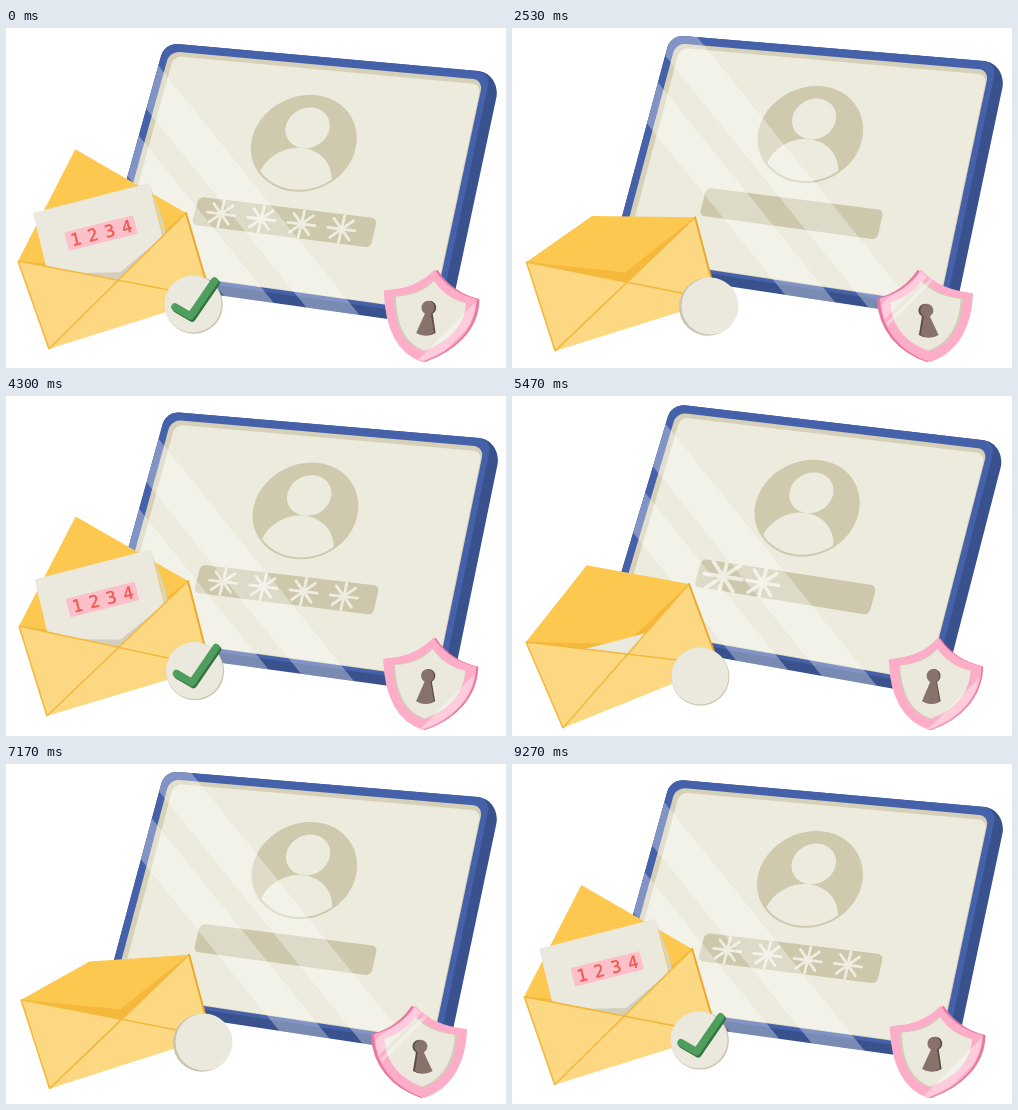
These frames come from a looping animation (500 by 340 pixels, 9.31 s). An HTML page:

```html
<!DOCTYPE html>
<html lang="en">
<head>
<meta charset="utf-8">
<title>Verification code</title>
<style>
  html, body { margin: 0; width: 100%; height: 100%; overflow: hidden; background: #fff; }
  svg { display: block; width: 100vw; height: 100vh; }
  text { font: 17px "DejaVu Sans Mono", monospace; text-anchor: middle; fill: #ee5b50; stroke: #ee5b50; stroke-width: .4; }
</style>
</head>
<body>
<svg viewBox="0 0 500 340">
  <defs>
    <clipPath id="slabClip"><path id="slabArea"/></clipPath>
    <clipPath id="faceClip"><path id="avatarArea"/></clipPath>
    <clipPath id="letterClip"><path id="mouth"/></clipPath>
    <clipPath id="shieldClip"><path id="shieldArea"/></clipPath>
  </defs>
  <g id="tablet">
    <path id="slab" fill="#39528e"/>
    <path id="frame" fill="#4561a9"/>
    <path id="bevel" fill="#d6d0b8"/>
    <path id="screen" fill="#ecebde"/>
    <path id="avatar" fill="#cfcaae"/>
    <g fill="#ecebde">
      <path id="body" clip-path="url(#faceClip)"/>
      <path id="head"/>
    </g>
    <path id="bar" fill="#cdc8ac"/>
    <g id="stars" fill="none" stroke="#efede1" stroke-linecap="round"></g>
    <g clip-path="url(#slabClip)"><path id="glare" fill="#fff" opacity=".32"/></g>
  </g>
  <g id="envelope" stroke-linejoin="round">
    <path id="inside" fill="#f5b83b"/>
    <path id="flapBack" fill="#fcc850"/>
    <g clip-path="url(#letterClip)">
      <g id="letter">
        <path d="M27 185L143 155L178 295L60 320Z" fill="#ebe9dd"/>
        <path d="M143 155L157 193L178 295L174 296L154 194Z" fill="#d9d5c3"/>
        <g transform="translate(95 205) rotate(-14)">
          <rect x="-35.5" y="-9.5" width="71" height="19" rx="1.5" fill="#fdbfca"/>
          <text x="-26" y="6">1</text><text x="-8.5" y="6">2</text>
          <text x="9" y="6">3</text><text x="26.5" y="6">4</text>
        </g>
      </g>
      <path id="fold" fill="#cfcab4" opacity=".8"/>
    </g>
    <path id="pocket" fill="#fdd882"/>
    <path id="seams" fill="none" stroke="#f3b93f" stroke-width="1.6"/>
    <path id="flapFront" fill="#fdd882" stroke="#f3b93f" stroke-width="1.6"/>
    <path id="edge" fill="none" stroke="#eba92e" stroke-width="2" stroke-linecap="round"/>
  </g>
  <g id="badge">
    <circle id="rim" r="29" fill="#cbc5ac"/>
    <circle r="28.5" fill="#ebe9dd"/>
    <g fill="none" stroke-width="7.5" stroke-linecap="round" stroke-linejoin="round">
      <path class="tick" pathLength="1" d="M-16.5 5L-1 14L23 -21" stroke="#33733f"/>
      <path class="tick" pathLength="1" d="M-18 3L-2.5 12L21.5 -23" stroke="#4f9e5d"/>
    </g>
  </g>
  <g id="shield" stroke-linejoin="round">
    <path id="shieldSide" fill="#e8789f" stroke="#e8789f" stroke-width="2"/>
    <path id="shieldFront" fill="#fdadc8" stroke="#fdadc8" stroke-width="2"/>
    <path id="shieldLip" fill="#d3cdb6"/>
    <path id="shieldInner" fill="#ebe9dd"/>
    <path id="keySide" fill="#5e4e47"/>
    <path id="key" fill="#87736a"/>
    <g clip-path="url(#shieldClip)"><path id="gleam" fill="#fff" opacity=".38"/></g>
  </g>
</svg>
<script>
const PERIOD = 4655;
const $ = id => document.getElementById(id);
const setPath = (id, d) => $(id).setAttribute('d', d);

// time, tablet corners (clockwise from top left), glare, shield yaw, badge centre
const SCENE = [
  [0, 160, 15, 483, 44, 431, 288, 97, 241, 2, .95, 187, 276],
  [815, 161, 8, 482, 45.5, 419, 290, 94, 232, 11, .7, 188, 280],
  [1400, 161, 5, 481, 43, 414, 286, 94, 229, 32, 0, 194, 281],
  [2525, 160, 7, 483, 34, 431, 281, 100, 231, 58, -1, 198, 278],
  [3300, 162, 13, 485, 39, 435, 283, 101, 236, 28, -.35, 195, 275],
  [4300, 161.5, 15.5, 484, 43, 434, 287, 99, 241, -2, .82, 188.5, 274.5]
];
// time, envelope corners (clockwise from the left hinge)
const ENVELOPE = [
  [0, 12, 233, 180, 185, 205, 270, 43, 321],
  [480, 8, 238, 179, 183, 206, 269, 46, 326],
  [815, 14, 246, 177, 188, 207, 269, 51, 332],
  [1400, 11, 240, 173, 180, 208, 264, 49, 327],
  [2300, 13, 241, 178, 188, 206, 270, 47, 329],
  [2500, 15.5, 237, 183, 191.5, 205, 273, 44, 326],
  [2545, 14, 233, 183, 188.5, 205, 272, 43, 322],
  [3050, 11, 231, 181, 184, 205, 271, 42, 321],
  [3400, 13.5, 231, 182, 185, 204, 271, 41, 320],
  [4300, 13, 230, 182, 185, 204, 271, 41, 320]
];

const clamp = x => Math.min(1, Math.max(0, x));
const ease = x => x < .5 ? 4 * x ** 3 : 1 - 4 * (1 - x) ** 3;
const ramp = (t, from, to) => ease(clamp((t - from) / (to - from)));
const lerp = (a, b, k) => a + (b - a) * k;
const mix = (p, q, k) => [lerp(p[0], q[0], k), lerp(p[1], q[1], k)];
const shift = (p, x, y) => [p[0] + x, p[1] + y];
const str = p => p[0].toFixed(2) + ' ' + p[1].toFixed(2);
const poly = pts => 'M' + pts.map(str).join('L') + 'Z';

// Smooth periodic interpolation through keys
function pose(keys, t) {
  const n = keys.length;
  const at = i => keys[(i + n) % n];
  const time = i => at(i)[0] + Math.floor(i / n) * PERIOD;
  let i = n - 1;
  while (keys[i][0] > t) i--;
  const t0 = time(i), h = time(i + 1) - t0, x = (t - t0) / h;
  return at(i).slice(1).map((a, j) => {
    const v = k => at(k)[j + 1];
    const b = v(i + 1);
    const m0 = (b - v(i - 1)) / (time(i + 1) - time(i - 1)) * h;
    const m1 = (v(i + 2) - a) / (time(i + 2) - t0) * h;
    return a + x * m0 + x * x * (3 * (b - a) - 2 * m0 - m1) + x ** 3 * (2 * (a - b) + m0 + m1);
  });
}

const pairs = v => [0, 2, 4, 6].map(i => [v[i], v[i + 1]]);

function roundRect(u0, v0, u1, v1, ru, rv) {
  const pts = [];
  const corners = [[u1 - ru, v1 - rv], [u0 + ru, v1 - rv], [u0 + ru, v0 + rv], [u1 - ru, v0 + rv]];
  corners.forEach(([u, v], c) => {
    for (let i = 0; i <= 6; i++) {
      const a = (c + i / 6) * Math.PI / 2;
      pts.push([u + ru * Math.cos(a), v + rv * Math.sin(a)]);
    }
  });
  return pts;
}

function ellipse(u, v, ru, rv) {
  return Array.from({ length: 48 }, (_, i) => {
    const a = i * Math.PI / 24;
    return [u + ru * Math.cos(a), v + rv * Math.sin(a)];
  });
}

// Circle units are relative to the avatar disc
const disc = (x, y, rx, ry) => ellipse(.492 + x * .158, .366 + y * .205, rx * .158, ry * .205);

for (let i = 0; i < 4; i++)
  $('stars').appendChild(document.createElementNS('http://www.w3.org/2000/svg', 'path'));

function starScale(t, i) {
  const out = clamp((t - 711 + i * 68) / 260);
  const into = clamp((t - 3250 - i * 120) / 380);
  if (t < 2000) return out < .5 ? 1 + .42 * Math.sin(out * Math.PI) : 1.42 * (1 - ease(out * 2 - 1));
  return into < .55 ? 1.42 * ease(into / .55) : 1 + .42 * (1 - ease((into - .55) / .45));
}

function drawTablet(t, [tl, tr, br, bl], glare) {
  const map = ([u, v]) => mix(mix(tl, tr, u), mix(bl, br, u), v);
  const face = pts => poly(pts.map(map));
  const outline = roundRect(-.004, 0, 1.006, 1, .04, .055).map(map);
  let slab = '';
  for (let i = 0; i <= 10; i++) {
    const a = i * Math.PI / 20;
    slab += poly(outline.map(p => shift(p, 8.5 * Math.sin(a), 11 * (1 - Math.cos(a)))));
  }
  setPath('slab', slab);
  setPath('slabArea', slab);
  setPath('frame', poly(outline));
  setPath('bevel', face(roundRect(.018, .034, .987, .984, .03, .042)));
  setPath('screen', face(roundRect(.034, .053, .984, .981, .026, .036)));
  setPath('avatar', face(disc(0, 0, 1, 1)));
  setPath('avatarArea', face(disc(0, 0, .96, .96)));
  setPath('body', face(disc(0, .8, .7, .7)));
  setPath('head', face(disc(0, -.32, .42, .42)));
  setPath('bar', face(roundRect(.222, .64, .762, .762, .016, .024)));

  [...$('stars').children].forEach((star, i) => {
    const k = starScale(t, i);
    let d = '';
    for (let j = 0; j < 4; j++) {
      const a = j * Math.PI / 4;
      const x = .041 * k * Math.cos(a), y = .056 * k * Math.sin(a);
      const u = .3 + .1215 * i;
      d += 'M' + str(map([u - x, .701 - y])) + 'L' + str(map([u + x, .701 + y]));
    }
    star.setAttribute('d', d);
    star.setAttribute('stroke-width', 2.8 * k);
    star.style.display = k > .02 ? '' : 'none';
  });

  const band = (a, b) => poly([[a, 0], [b, 0], [b + 340 / 1.24, 340], [a + 340 / 1.24, 340]]);
  setPath('glare', band(glare, glare + 44) + band(glare + 73, glare + 120));
}

function cross(a, b, c, d) {
  const rx = b[0] - a[0], ry = b[1] - a[1], sx = d[0] - c[0], sy = d[1] - c[1];
  const k = ((c[0] - a[0]) * sy - (c[1] - a[1]) * sx) / (rx * sy - ry * sx);
  return mix(a, b, k);
}

function drawEnvelope(t, [l, r, br, bl]) {
  const c = cross(l, br, bl, r);
  const open = t < 2000 ? 1 - ramp(t, 600, 1100) : ramp(t, 2180, 2880);
  const down = t < 2000 ? ramp(t, 400, 1120) : 1 - ramp(t, 2600, 3250);
  const tip = shift(c, -43 * open - 54 * open * (1 - open), -131 * open);
  const hinge = lerp(l[1], r[1], (tip[0] - l[0]) / (r[0] - l[0]));
  const raised = tip[1] < hinge;

  setPath('inside', poly([l, r, c]));
  setPath('flapBack', raised ? poly([l, tip, r, shift(c, -2, -10)]) : '');
  setPath('mouth', poly([l, [l[0], 0], [r[0], 0], r, c]));
  $('letter').setAttribute('transform',
    `translate(${(l[0] + r[0] - 192) / 2 + 27 * down} ${(l[1] + r[1] - 418) / 2 + 96 * down})`);
  $('letter').style.display = down < 1 ? '' : 'none';
  setPath('fold', down < .6 ? poly([mix(l, c, .62), c, mix(c, r, .68), mix(c, r, .62), shift(c, 2, -8)]) : '');
  setPath('pocket', poly([l, c, r, br, bl]));
  setPath('seams', 'M' + [l, br].map(str).join('L') + 'M' + [bl, r].map(str).join('L') + 'M' + [l, bl].map(str).join('L'));
  setPath('flapFront', raised ? '' : poly([l, tip, r]));
  $('flapFront').setAttribute('stroke', open > 0 ? '#f3b93f' : 'none');
  setPath('edge', 'M' + [r, br].map(str).join('L'));
}

function drawBadge(t, x, y, yaw) {
  $('badge').setAttribute('transform', `translate(${x} ${y})`);
  $('rim').setAttribute('cx', 1.5 * yaw - .6);
  $('rim').setAttribute('cy', .8);
  const drawn = t < 2000 ? 1 - ramp(t, 150, 600) : ramp(t, 3250, 3750);
  document.querySelectorAll('.tick').forEach(p => {
    p.style.display = drawn > .01 ? '' : 'none';
    p.setAttribute('stroke-dasharray', drawn > .99 ? 'none' : drawn + ' 2');
  });
}

function shieldPath(q, size, dx) {
  const at = (x, y) => str([419 + 3 * q + (x - 419 - 3 * q) * size + dx, 287 + (y - 287) * size]);
  const top = [419 + 11 * q, 243], right = [465 + 6 * q, 269 + 3 * q];
  const left = [374 + 6 * q, 267 - 4 * q], low = [419 - 2 * q * q, 333];
  return `M${at(...top)}Q${at(435 + 9 * q, 264 + q)} ${at(...right)}` +
    `C${at(right[0] - 1, right[1] + 30)} ${at(low[0] + 29, low[1] - 10)} ${at(...low)}` +
    `C${at(low[0] - 29, low[1] - 10)} ${at(left[0] + 1, left[1] + 30)} ${at(...left)}` +
    `Q${at(403 + 9 * q, 263 - q)} ${at(...top)}Z`;
}

function keyPath(q, dx) {
  const x = 418.5 + 4 * q + dx, y = 281.5 - 1.5 * q, b = 418.5 + q + dx, e = 307 - q;
  return `M${x - 3} ${y + 5.5}A6.5 6.8 0 1 1 ${x + 3} ${y + 5.5}` +
    `L${b + 8.7} ${e - 1}Q${b} ${e + 4} ${b - 9} ${e - 1}Z`;
}

function drawShield(q) {
  const turn = q * Math.abs(q);
  const front = shieldPath(q, 1, -turn);
  setPath('shieldSide', shieldPath(q, 1, 2 * turn));
  setPath('shieldFront', front);
  setPath('shieldArea', front);
  setPath('shieldLip', shieldPath(q, .79, -turn));
  setPath('shieldInner', shieldPath(q, .77, .5 * turn));
  setPath('keySide', keyPath(q, 1.6 * turn));
  setPath('key', keyPath(q, -.4 * turn));
  const c = 745 + 48 * q - 42 * q * q;
  const band = (a, b) => poly([[a - 220, 220], [b - 220, 220], [b - 340, 340], [a - 340, 340]]);
  setPath('gleam', band(c - 9, c + 9) + band(c + 14, c + 19));
}

function draw(now) {
  const t = now % PERIOD;
  const s = pose(SCENE, t);
  drawTablet(t, pairs(s), s[8]);
  drawEnvelope(t, pairs(pose(ENVELOPE, t)));
  drawBadge(t, s[10], s[11], s[9]);
  drawShield(s[9]);
}

const start = performance.now();
function tick() {
  draw(performance.now() - start);
  requestAnimationFrame(tick);
}
tick();
</script>
</body>
</html>
```
